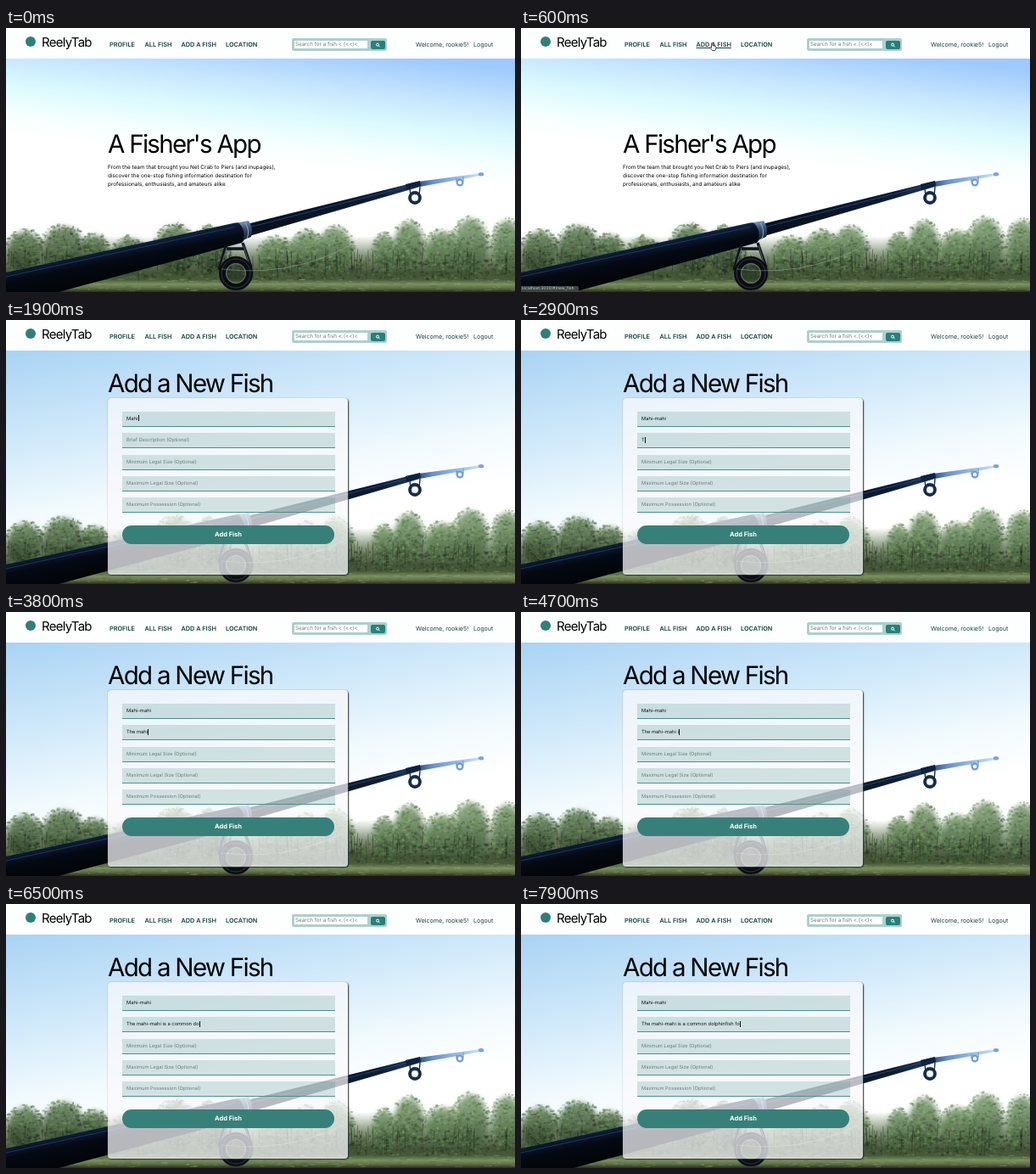
These frames come from a looping animation (600x311 px, 8000 ms). An HTML page with a canvas:

```html
<!DOCTYPE html>
<html lang="en">
<head>
<meta charset="utf-8">
<title>Add a New Fish</title>
<style>
  html, body { margin: 0; width: 100%; height: 100%; overflow: hidden; background: #fff; }
  #stage {
    position: absolute; left: 0; top: 0; width: 600px; height: 311px; overflow: hidden;
    font-family: Inter, "Open Sans", sans-serif; color: #111;
    font-optical-sizing: none; text-rendering: geometricPrecision;
  }
  #stage > *, .t, .box, .field { position: absolute; }
  .t { white-space: pre; line-height: 10px; }
  #sky { left: 0; top: 36px; width: 600px; height: 275px;
    background: linear-gradient(170deg, #a9d3f4, #cfe8fa 28%, #f2fafe 52%, #fff 68%); }
  #sky.home { background: linear-gradient(186deg, #9fcafd 4%, #c6e5fe 17%, #dcfaff 28%, #f6ffff 38%, #fff 45%); }
  nav { left: 0; top: 0; width: 600px; height: 36px; background: #fdfefe; color: #16423f; }
  .brand { left: 42px; top: 12px; font-size: 15px; letter-spacing: -.05em; color: #000; }
  .mark { left: 23px; top: 10px; width: 12px; height: 12px; border-radius: 50%; background: #2f8079; }
  .link { top: 14.5px; font-size: 7.3px; font-weight: 600; }
  .link.hover { text-decoration: underline; text-underline-offset: 1px; }
  .user { top: 14.5px; font-size: 7.1px; }
  .search { left: 337px; top: 12px; width: 112px; height: 15px; border-radius: 2px; background: #acd0cb; }
  .query { left: 3px; top: 3px; width: 86px; height: 9px; background: #fff;
    font-size: 6.3px; color: #757575; line-height: 9px; padding-left: 1px; box-sizing: border-box; white-space: pre; }
  .go { left: 93px; top: 3px; width: 17px; height: 10px; border-radius: 2px; background: #27807a; }
  h1 { margin: 0; left: 120px; font-size: 29.5px; font-weight: 400; letter-spacing: -.058em; color: #000; }
  #hero h1 { top: 132px; }
  #form h1 { top: 69.5px; }
  #hero p { margin: 0; left: 120px; top: 158.6px; font-size: 6.4px; line-height: 10.2px; color: #000; }
  .card { left: 120px; top: 92px; width: 283px; height: 207.5px; border-radius: 4px;
    background: rgba(250, 250, 252, .73); box-shadow: 1px 1px 1.5px #263234, 0 0 1px #63757a; }
  .field { left: 17px; width: 251px; height: 18px; box-sizing: border-box; padding-left: 5px;
    background: rgba(52, 132, 122, .2); border-bottom: 1px solid #4d908a;
    font-size: 5.75px; line-height: 17px; white-space: pre; color: #717c7a; }
  .field.filled { color: #111; }
  .caret { display: inline-block; width: .7px; height: 7px; margin-left: .3px; vertical-align: -1.4px; background: #111; }
  .send { left: 17px; top: 150px; width: 250px; height: 21.5px; border-radius: 11px; background: #37807a;
    color: #fff; font-size: 7.5px; font-weight: 700; line-height: 21px; text-align: center; }
  #status { left: 0; top: 304px; width: 68px; height: 7px; border-top-right-radius: 2px;
    background: #3c4441; color: #c9cfcc; font-size: 4.9px; line-height: 7px; padding-left: 1px;
    box-sizing: border-box; white-space: pre; }
  #pointer { left: 0; top: 0; width: 10px; height: 12px; overflow: visible; }
  #pointer path { fill: #fff; stroke: #111; stroke-width: .7; }
  #pointer .arrow { fill: #111; stroke: #fff; }
  [hidden] { display: none !important; }
</style>
</head>
<body>
<div id="stage">
  <div id="sky"></div>
  <canvas id="photo" width="600" height="311"></canvas>
  <nav>
    <div class="box mark"></div>
    <div class="t brand">ReelyTab</div>
    <div class="t link" style="left:122px">PROFILE</div>
    <div class="t link" style="left:163.5px">ALL FISH</div>
    <div class="t link" id="add" style="left:206.5px">ADD A FISH</div>
    <div class="t link" style="left:259px">LOCATION</div>
    <div class="box search">
      <div class="box query">Search for a fish &lt;.(&lt;&lt;)&lt;</div>
      <svg class="box go" viewBox="0 0 17 10" fill="none" stroke="#fff">
        <circle cx="8" cy="4.6" r="1.5"/><path d="M9.1 5.7 10.7 7.3"/>
      </svg>
    </div>
    <div class="t user" style="left:483px">Welcome, rookie5!</div>
    <div class="t user" style="left:551px">Logout</div>
  </nav>
  <section id="hero">
    <h1 class="t">A Fisher's App</h1>
    <p class="t">From the team that brought you Net Crab to Piers (and inupages),
discover the one-stop fishing information destination for
professionals, enthusiasts, and amateurs alike</p>
  </section>
  <section id="form" hidden>
    <h1 class="t">Add a New Fish</h1>
    <div class="box card" id="card"><div class="box send">Add Fish</div></div>
  </section>
  <div id="status">localhost:3000/#/new_fish</div>
  <svg id="pointer">
    <path class="arrow" d="M0 0V8.5L2 6.7 3.4 9.7 4.7 9.1 3.4 6.2H6Z"/>
    <path class="hand" d="M2 .7Q2 0 2.7 0T3.4 .7V3.4Q4.4 2.8 4.9 3.6 5.8 3.2 6.2 4 7.2 3.7 7.3 4.8V6.5L6.5 9H3L.4 5.8Q.3 4.7 1.2 5L2 5.8Z"/>
  </svg>
</div>
<script>
const $ = id => document.getElementById(id);
const LOOP = 8000, STEP = 100;

// Piecewise linear value through [x, y] points
function along(points, x) {
  if (x <= points[0][0]) return points[0][1];
  for (let i = 1; i < points.length; i++) {
    const [x0, y0] = points[i - 1], [x1, y1] = points[i];
    if (x <= x1) return y0 + (y1 - y0) * (x - x0) / (x1 - x0);
  }
  return points[points.length - 1][1];
}

function paintPhoto() {
  const c = $('photo').getContext('2d');
  let seed = 71;
  const rnd = () => (seed = (seed * 16807) % 2147483647) / 2147483647;
  const spread = size => (rnd() - .5) * 2 * size;

  const fade = (x0, y0, x1, y1, ...stops) => {
    const g = c.createLinearGradient(x0, y0, x1, y1);
    stops.forEach(([at, color]) => g.addColorStop(at, color));
    return g;
  };
  const shape = (d, fill) => { c.fillStyle = fill; c.fill(new Path2D(d)); };
  const line = (d, stroke, width) => {
    c.strokeStyle = stroke; c.lineWidth = width; c.stroke(new Path2D(d));
  };
  const ring = (x, y, r, width, color) => {
    c.beginPath(); c.arc(x, y, r, 0, 7);
    c.strokeStyle = color; c.lineWidth = width; c.stroke();
  };
  const blob = (x, y, rx, ry, color) => {
    c.fillStyle = color;
    c.beginPath(); c.ellipse(x, y, rx, ry, 0, 0, 7); c.fill();
  };
  const leaf = (x, y, light, alpha) =>
    blob(x, y, .7 + rnd() * 1.8, .6 + rnd() * 1.3, `hsla(${88 + rnd() * 25},${17 + rnd() * 12}%,${light}%,${alpha})`);

  // Ground
  c.fillStyle = fade(0, 245, 0, 311, [0, 'rgba(110,132,96,0)'], [.35, 'rgba(100,122,86,.8)'],
    [.65, '#435437'], [.78, '#485a39'], [.86, '#7b9060'], [.93, '#5d7045'], [1, '#2b2c20']);
  c.fillRect(0, 245, 600, 66);

  // Tree crowns: centre, top, half width
  const crowns = [[22, 237, 22], [105, 241, 17], [68, 231, 27], [145, 245, 20], [240, 233, 22], [200, 230, 26],
    [318, 245, 22], [355, 237, 22], [388, 232, 22], [446, 241, 15], [515, 237, 22], [475, 226, 20],
    [548, 222, 22], [591, 224, 19]];
  for (const [x, top, w] of crowns) {
    const shade = x < 300 ? 0 : 9;
    const h = (286 - top) / 2;
    c.save();
    c.filter = 'blur(3px)';
    blob(x, top + h + 3, w * .9, h, fade(0, top, 0, 286,
      [0, `hsla(105,18%,${42 + shade}%,.85)`], [1, `hsla(105,22%,${21 + shade}%,.85)`]));
    c.restore();
    for (let i = 0; i < w * 10; i++) {
      const a = rnd() * 6.3, r = Math.sqrt(rnd()) * 1.04;
      const dx = Math.cos(a) * r, dy = Math.sin(a) * r;
      leaf(x + dx * w, top + h + dy * h, 33 + shade - dy * 11 - dx * 5 + spread(17), .5);
    }
  }

  // Trunks, undergrowth and grass
  for (let i = 0; i < 90; i++)
    line(`M${rnd() * 600} ${258 + rnd() * 12}l${spread(2)} ${14 + rnd() * 16}`, 'rgba(25,34,20,.45)', .9);
  for (let i = 0; i < 1100; i++)
    leaf(rnd() * 600, 273 + rnd() * 23, 27 + spread(14), .5);
  for (let i = 0; i < 350; i++) {
    c.fillStyle = `hsla(${80 + rnd() * 20},24%,${26 + rnd() * 34}%,.4)`;
    c.fillRect(rnd() * 600, 295 + rnd() * 14, 2 + rnd() * 7, 1);
  }

  // Rod
  const butt = 'M0 288 270 229.5Q281 228 283 237T278 253L62 311H0Z';
  const blank = 'M284 231 486 181 562 170.7Q565 172 562 173.6L488 187 287 245Z';
  shape(blank, fade(285, 0, 564, 0, [0, '#070f1d'], [.55, '#0c1b33'], [.7, '#1d3860'], [.78, '#6491cd'], [1, '#d2e8ff']));
  line('M288 234.5 486 183.5', '#28466f', .9);
  shape(butt, fade(130, 255, 138, 295, [0, '#14294a'], [.2, '#0b182f'], [.45, '#040912'], [1, '#020408']));
  line('M0 293 270 234.5', 'rgba(55,88,139,.5)', 1.2);
  shape('M274 229 286 227Q292 236 289 246L279 250Q284 239 274 229Z',
    fade(280, 227, 285, 250, [0, '#7d9cc2'], [.4, '#3c536f'], [1, '#0f1a2a']));
  line('M282 229Q288 239 284 248', '#a9bfd6', .8);
  shape('M471 184 488 180 489 186 472 191Z', '#0d2140');
  blob(560, 172.2, 3.2, 2.2, '#78a5d8');

  // Line guides
  line('M259 257 251 285M279 253 289 282M257 260H282', '#0e141c', 3.4);
  line('M260 259 253 282M280 256 287 279', '#6c7f8e', .7);
  blob(271, 289, 14, 14, 'rgba(20,30,20,.4)');
  ring(271, 289, 16, 8, '#0a0e12');
  ring(271, 289, 17, .8, '#36424b');
  ring(271, 289, 11.5, .8, '#75848a');
  line('M476 189 477 198M488 187 487 198', '#182a44', 1.4);
  ring(482, 200, 6, 3.8, '#182a44');
  ring(482, 200, 4, .7, '#8ba4bf');
  line('M531 177V181M539 175V181', '#6f9bd0', 1.2);
  ring(535, 182, 3.4, 2.2, '#6f9bd0');
  line('M254 284Q306 290 350 278T418 247', 'rgba(195,208,205,.5)', .7);
}

const labels = ['Fish Name', 'Brief Description (Optional)', 'Minimum Legal Size (Optional)',
  'Maximum Legal Size (Optional)', 'Maximum Possession (Optional)'];
const fields = labels.map((label, i) => {
  const el = document.createElement('div');
  el.className = 'field';
  el.style.top = 15.8 + i * 25.4 + 'px';
  el.textContent = label;
  $('card').append(el);
  return el;
});
const caret = document.createElement('span');
caret.className = 'caret';

const typed = [
  { text: 'Mahi-mahi', keys: [[1400, 0], [1900, 4], [2500, 9]] },
  { text: 'The mahi-mahi is a common dolphinfish fo',
    keys: [[2800, 0], [2900, 1], [4700, 15], [6500, 28], [7900, 40]] }
];
const pathX = [[100, 252], [500, 222.5], [1000, 222.5], [1300, 190]];
const pathY = [[100, -12], [500, 17.5], [1000, 17.5], [1300, 116]];

function fill(i, t, focused) {
  const { text, keys } = typed[i];
  const count = Math.floor(along(keys, t) + 1e-6);
  const el = fields[i];
  el.classList.toggle('filled', count > 0);
  el.textContent = count ? text.slice(0, count) : labels[i];
  if (focused) count ? el.append(caret) : el.prepend(caret);
}

function show(t) {
  const hover = t >= 500 && t <= 1000;
  const onForm = t >= 900;
  $('hero').hidden = onForm;
  $('form').hidden = !onForm;
  $('sky').classList.toggle('home', !onForm);
  $('add').classList.toggle('hover', hover);
  $('status').hidden = !hover;
  fill(0, t, t >= 1300 && t < 2700);
  fill(1, t, t >= 2700);

  const pointer = $('pointer');
  pointer.style.display = t >= 100 && t < 1400 ? '' : 'none';
  pointer.style.transform = `translate(${along(pathX, t)}px, ${along(pathY, t)}px)`;
  pointer.querySelector('.hand').style.display = hover ? '' : 'none';
  pointer.querySelector('.arrow').style.display = hover ? 'none' : '';
}

const start = performance.now();
let last = -1;
function tick() {
  const elapsed = Math.max(0, performance.now() - start) % LOOP;
  const t = Math.floor(elapsed / STEP) * STEP;
  if (t !== last) show(last = t);
  requestAnimationFrame(tick);
}
paintPhoto();
tick();
</script>
</body>
</html>
```
